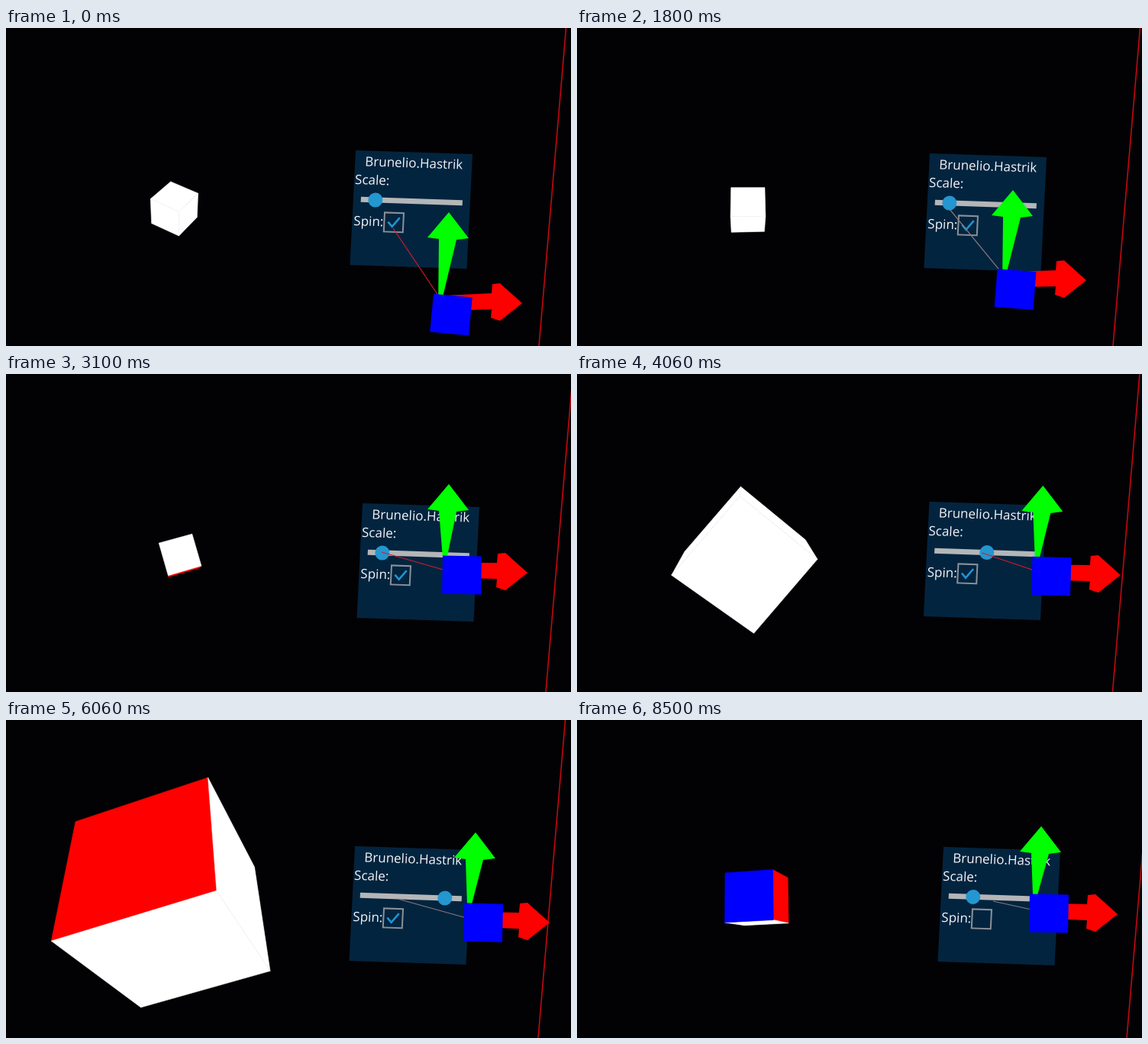
Write an HTML page with a canvas that moves like this. It is 740 px wide and 416 px high and loops after 8530 ms.

```html
<!DOCTYPE html>
<html lang="en">
<head>
<meta charset="utf-8">
<title>Spinning cube with a floating panel</title>
<style>
  html, body { margin: 0; width: 100%; height: 100%; overflow: hidden; background: #020204; }
  canvas { display: block; }
</style>
</head>
<body>
<canvas id="stage" width="740" height="416"></canvas>
<script>
const ctx = document.getElementById('stage').getContext('2d');
const LOOP = 8.53, FOCAL = 600, RAD = Math.PI / 180;

// Each row: time in seconds, then the values at that time.
const VIEW = [ // panel corner x, y, cube centre x, y
  [0, 458, 160, 221, 236], [1.8, 462, 164, 224, 238], [3.1, 467, 169, 228, 238],
  [5, 456, 165, 217, 236], [6.06, 457, 165, 219, 231], [7.16, 469, 158, 226, 227],
  [8.5, 480, 166, 237, 234]
];
const HAND = [ // box x, y, roll, up tip x, y, right tip x, y, laser end x, y
  [0, 583, 375, 5.5, -3, -134, 93, -15, 507, 262],
  [1.8, 574, 342, 4.5, -3, -130, 93, -12, 488, 237],
  [3.1, 597, 263, 1, -17, -119, 86, -3, 492, 233],
  [5, 645, 266, 2.5, -5, -118, 95, 0, 568, 235],
  [6.06, 625, 265, 1.5, -10, -118, 87, 0, 513, 234],
  [7.16, 617, 281, 1, -12, -114, 91, -2, 527, 254],
  [8.5, 618, 253, 1, -10, -114, 90, 1, 545, 247 - 10]
];
const SLIDER = [[0, 19], [3.5, 19], [4.1, 72], [5.1, 72], [5.8, 111], [6.3, 111], [6.9, 32], [8.5, 32]];

function sample(keys, t) {
  let i = 1;
  while (i < keys.length - 1 && keys[i][0] < t) i++;
  const a = keys[i - 1], b = keys[i];
  const k = Math.min(1, (t - a[0]) / (b[0] - a[0]));
  return a.slice(1).map((v, j) => v + (b[j + 1] - v) * k);
}

function polygon(color, points) {
  ctx.beginPath();
  points.forEach(p => ctx.lineTo(p[0], p[1]));
  ctx.closePath();
  ctx.fillStyle = color;
  ctx.fill();
}

function line(color, width, ...points) {
  ctx.beginPath();
  points.forEach(p => ctx.lineTo(p[0], p[1]));
  ctx.strokeStyle = color;
  ctx.lineWidth = width;
  ctx.stroke();
}

const spinning = t => t < 0.15 || (t > 0.99 && t < 7.7);

// Seconds of spin so far; it stands still while the box is unchecked.
function spinTime(t) {
  if (t < 0.99) return Math.min(t + 0.84, 0.99);
  return Math.min(t, 7.7);
}

function drawCube(t, cx, cy, size) {
  const s = spinTime(t) - 7.16;
  const spin = -53 * RAD + s, tilt = 20 * RAD - s / 3, yaw = 14 * RAD;
  const orient = ([x, y, z]) => {
    [x, z] = [x * Math.cos(spin) + z * Math.sin(spin), z * Math.cos(spin) - x * Math.sin(spin)];
    [y, z] = [y * Math.cos(tilt) + z * Math.sin(tilt), z * Math.cos(tilt) - y * Math.sin(tilt)];
    return [x * Math.cos(yaw) + z * Math.sin(yaw), y, z * Math.cos(yaw) - x * Math.sin(yaw)];
  };
  const place = v => {
    const [x, y, z] = orient(v).map(c => c * size / 2);
    return [cx - 370 + x, 208 - cy + y, z - FOCAL];
  };
  const project = ([x, y, z]) => [370 - x * FOCAL / z, 208 + y * FOCAL / z];
  for (let axis = 0; axis < 3; axis++) for (const side of [1, -1]) {
    const normal = [0, 0, 0];
    normal[axis] = side;
    const n = orient(normal), mid = place(normal);
    if (n[0] * mid[0] + n[1] * mid[1] + n[2] * mid[2] >= 0) continue;
    const corners = [[1, 1], [1, -1], [-1, -1], [-1, 1]].map(([a, b]) => {
      const v = normal.slice();
      v[(axis + 1) % 3] = a;
      v[(axis + 2) % 3] = b;
      return project(place(v));
    });
    const color = side < 0 || axis === 1 ? '#fff' : axis === 0 ? '#f00' : '#00f';
    polygon(color, corners);
    ctx.strokeStyle = color;
    ctx.lineWidth = 0.6;
    ctx.stroke();
  }
}

function drawPanel(t, x, y, value) {
  ctx.save();
  ctx.transform(1, 0.033, -0.05, 1, x, y);
  ctx.fillStyle = '#03243f';
  ctx.fillRect(0, 0, 153, 150);
  ctx.fillStyle = '#f2f4f6';
  ctx.font = '17px "Open Sans", "Noto Sans", sans-serif';
  ctx.textAlign = 'center';
  ctx.fillText('Brunelio.Hastrik', 77, 20);
  ctx.textAlign = 'left';
  ctx.fillText('Scale:', 1, 44);
  ctx.fillText('Spin:', 2, 98);
  line('#b4b6b8', 7, [10, 64], [143, 64]);
  ctx.beginPath();
  ctx.arc(10 + value, 64, 9.5, 0, 7);
  ctx.fillStyle = '#2496d0';
  ctx.fill();
  ctx.strokeStyle = '#8a9199';
  ctx.lineWidth = 2;
  ctx.strokeRect(42, 80, 25, 25);
  if (spinning(t)) line('#1f93d2', 2.6, [47, 92], [52.5, 98], [62, 86]);
  ctx.restore();
}

function drawHand(t, [x, y, roll, ux, uy, rx, ry, lx, ly]) {
  const pressed = t < 0.25 || (t > 2.3 && t < 5.9);
  line(pressed ? '#d01c2c' : '#85777b', 1.2, [lx, ly], [x, y]);
  ctx.save();
  ctx.translate(x, y);
  const baseY = ry * 0.75 - 14;
  polygon('#f00', [
    [-3, baseY], [rx - 40, ry - 13], [rx - 39, ry - 25], [rx - 29, ry - 26], [rx, ry],
    [rx - 29, ry + 23], [rx - 41, ry + 19], [rx - 40, ry + 8], [-3, baseY + 20]
  ]);
  const baseX = ux * 0.6 - 13;
  polygon('#0f0', [
    [baseX - 2, -24], [ux - 13, uy + 35], [ux - 28, uy + 33], [ux, uy],
    [ux + 26, uy + 34], [ux + 10, uy + 36], [baseX + 4, -24]
  ]);
  ctx.rotate(roll * RAD);
  ctx.fillStyle = '#00f';
  ctx.fillRect(-25.5, -25, 51, 50);
  ctx.restore();
}

function draw(now) {
  const t = now / 1000 % LOOP;
  const [px, py, cx, cy] = sample(VIEW, t);
  const [value] = sample(SLIDER, t);
  ctx.fillStyle = '#020204';
  ctx.fillRect(0, 0, 740, 416);
  line('#c40810', 1.6, [px + 275.5, 0], [px + 240, 416]);
  drawCube(t, cx, cy, 13 + 1.55 * value);
  drawPanel(t, px, py, value);
  drawHand(t, sample(HAND, t));
}

const start = performance.now();
function tick() {
  draw(performance.now() - start);
  requestAnimationFrame(tick);
}
tick();
</script>
</body>
</html>
```
